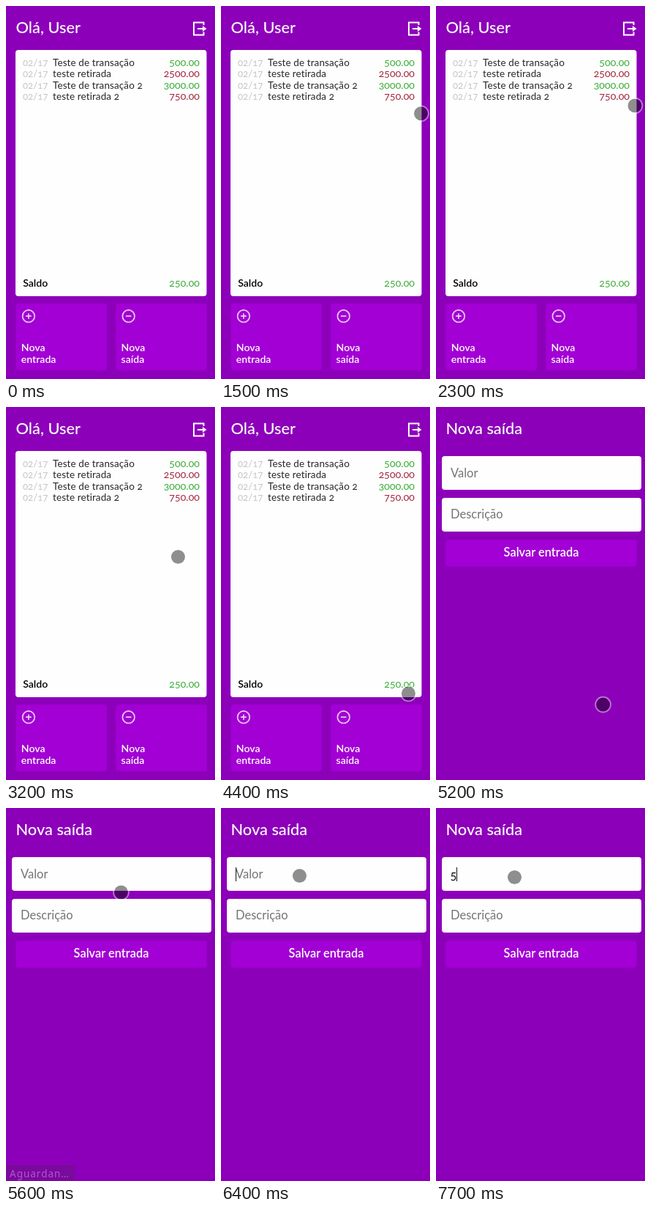
An HTML page that plays this animation: 286x509 px, repeating every 8 s.

```html
<!DOCTYPE html>
<html lang="pt-BR">
<head>
<meta charset="utf-8">
<title>Carteira</title>
<style>
  html, body { margin: 0; width: 100%; height: 100%; overflow: hidden; background: #8d00ba; }
  svg { display: block; width: 100vw; height: 100vh; font-family: Lato, sans-serif; font-variant-numeric: oldstyle-nums; }
  .bold { font-weight: 600; fill: #fff; }
  .title { font-size: 21.8px; font-weight: 500; }
  .label { font-size: 14.1px; }
  .date { font-size: 13.2px; fill: #c6c6c6; }
  .name { font-size: 13.5px; fill: #262626; }
  .amount { font-size: 14.2px; text-anchor: end; }
  .field { font-size: 16.5px; fill: #757575; }
  .panel { fill: #fefefe; }
  .button { fill: #a200d4; }
  .icon { fill: none; stroke: #eccdf6; stroke-width: 1.7; }
  .in { fill: #3aad35; }
  .out { fill: #a2263c; }
</style>
</head>
<body>
<svg viewBox="0 0 286 509" preserveAspectRatio="none">
  <rect width="286" height="509" fill="#8d00ba"/>

  <g id="home">
    <text class="bold title" x="13.5" y="37">Olá, User</text>
    <path d="M270.5 26V22.5H257V39.5H270.5V35.5M262 31H270" fill="none" stroke="#fff" stroke-width="2"/>
    <path d="M269 27L274.5 31L269 35Z" fill="#fff"/>
    <rect class="panel" x="13" y="60" width="261.5" height="336" rx="4"/>
    <g id="rows"></g>
    <text class="bold label" x="23.2" y="383" style="fill:#000">Saldo</text>
    <text class="amount in" x="265" y="383">250.00</text>
    <g id="buttons"></g>
  </g>

  <g id="form">
    <text class="bold title" x="13.5" y="37">Nova saída</text>
    <rect class="panel" x="8" y="67" width="273" height="46" rx="4"/>
    <rect class="panel" x="8" y="124" width="273" height="46" rx="4"/>
    <text id="hint" class="field" x="20" y="96">Valor</text>
    <text id="value" class="field" x="19.5" y="96.5" style="fill:#111">5</text>
    <text class="field" x="20" y="152">Descrição</text>
    <rect id="caret" y="81" width="1" height="19" fill="#111"/>
    <rect class="button" x="13.5" y="181" width="261" height="37" rx="4"/>
    <text class="bold" x="144" y="203.5" font-size="16.4" text-anchor="middle">Salvar entrada</text>
    <g id="status">
      <path d="M0 487H90Q94 487 94 491V509H0Z" fill="#7a0a9c"/>
      <text x="5" y="503.5" font-size="13.5" letter-spacing="1" fill="#b553d6" style="font-family:'Noto Sans',sans-serif">Aguardan…</text>
    </g>
  </g>

  <g id="pointer">
    <circle r="9.6" fill="#000" fill-opacity=".44"/>
    <circle r="10.4" fill="none" stroke="#fff" stroke-opacity=".45" stroke-width="1.8"/>
  </g>
</svg>
<script>
const LOOP = 8000, STEP = 100;
const OPEN_FORM = 5200, STATUS_END = 5800, FOCUS = 6100, TYPED = 7700;
const BLINKS = [FOCUS, 6800, 7200, 7500, TYPED];

// Pointer sweeps: each starts where the one before ended and bows sideways.
const entry = { x: 282, y: 138 };
const sweeps = [
  { at: 1500, steps: 4, x: 216, y: 150, bow: -10 },
  { at: 2000, steps: 4, x: 272, y: 136, bow: -26 },
  { at: 2500, steps: 4, x: 256, y: 120, bow: -32 },
  { at: 3000, steps: 3, x: 235.5, y: 204.5, bow: 22 },
  { at: 3400, steps: 4, x: 228, y: 397, bow: 8 },
  { at: 3900, steps: 4, x: 193.5, y: 374, bow: 45 },
  { at: 4400, steps: 1, x: 256.5, y: 391, bow: 0 },
  { at: 4500, steps: 4, x: 228, y: 445, bow: -15 },
  { at: 5000, steps: 2, x: 228.5, y: 438.5, bow: 0 },
  { at: 5200, steps: 5, x: 157.5, y: 115, bow: 12 },
  { at: 5700, steps: 2, x: 114.5, y: 85, bow: -4 },
  { at: 5900, steps: 4, x: 107.5, y: 90.5, bow: -6 },
  { at: 6400, steps: 2, x: 107.5, y: 94.5, bow: 0 }
];

const rows = [
  ["Teste de transação", "500.00", "in"],
  ["teste retirada", "2500.00", "out"],
  ["Teste de transação 2", "3000.00", "in"],
  ["teste retirada 2", "750.00", "out"]
];

const $ = id => document.getElementById(id);
const show = (id, on) => $(id).setAttribute("visibility", on ? "inherit" : "hidden");

$("rows").innerHTML = rows.map(([name, amount, kind], i) => {
  const y = 82 + i * 15.3;
  return `<text class="date" x="23" y="${y}">02/17</text>
    <text class="name" x="64" y="${y}" letter-spacing=".1">${name}</text>
    <text class="amount ${kind}" x="265" y="${y}">${amount}</text>`;
}).join("");

$("buttons").innerHTML = ["entrada", "saída"].map((word, i) => `
  <g transform="translate(${13.5 + i * 136.8} 406)">
    <rect class="button" width="124.5" height="91" rx="4"/>
    <circle class="icon" cx="17.4" cy="17.2" r="8.3"/>
    <path class="icon" d="M13.6 17.2h7.6${i ? "" : "m-3.8 -3.8v7.6"}"/>
    <text class="bold label" x="7.3" y="65">Nova</text>
    <text class="bold label" x="7.3" y="81">${word}</text>
  </g>`).join("");

// Half an ellipse from a to b, its height given by the bow.
function arc(a, b, f) {
  const dx = b.x - a.x, dy = b.y - a.y;
  const along = (1 - Math.cos(Math.PI * f)) / 2;
  const aside = b.bow * Math.sin(Math.PI * f) / Math.hypot(dx, dy);
  return [a.x + dx * along - dy * aside, a.y + dy * along + dx * aside];
}

function pointerAt(t) {
  const i = sweeps.findLastIndex(s => s.at <= t);
  if (i < 0) return null;
  const sweep = sweeps[i];
  const step = Math.floor((t - sweep.at) / STEP) + 1;
  return arc(sweeps[i - 1] || entry, sweep, Math.min(1, step / sweep.steps));
}

function render(t) {
  const onForm = t >= OPEN_FORM, typed = t >= TYPED;
  show("home", !onForm);
  show("form", onForm);
  show("hint", !typed);
  show("value", typed);
  show("caret", BLINKS.filter(b => b <= t).length % 2);
  $("caret").setAttribute("x", typed ? 28 : 20);
  show("status", t >= OPEN_FORM + STEP && t < STATUS_END);
  $("status").setAttribute("opacity", t < STATUS_END - STEP ? 1 : 0.5);

  const p = pointerAt(t);
  show("pointer", p);
  if (p) $("pointer").setAttribute("transform", `translate(${p})`);
}

const start = performance.now();
function tick() {
  render((performance.now() - start) % LOOP);
  requestAnimationFrame(tick);
}
tick();
</script>
</body>
</html>
```
